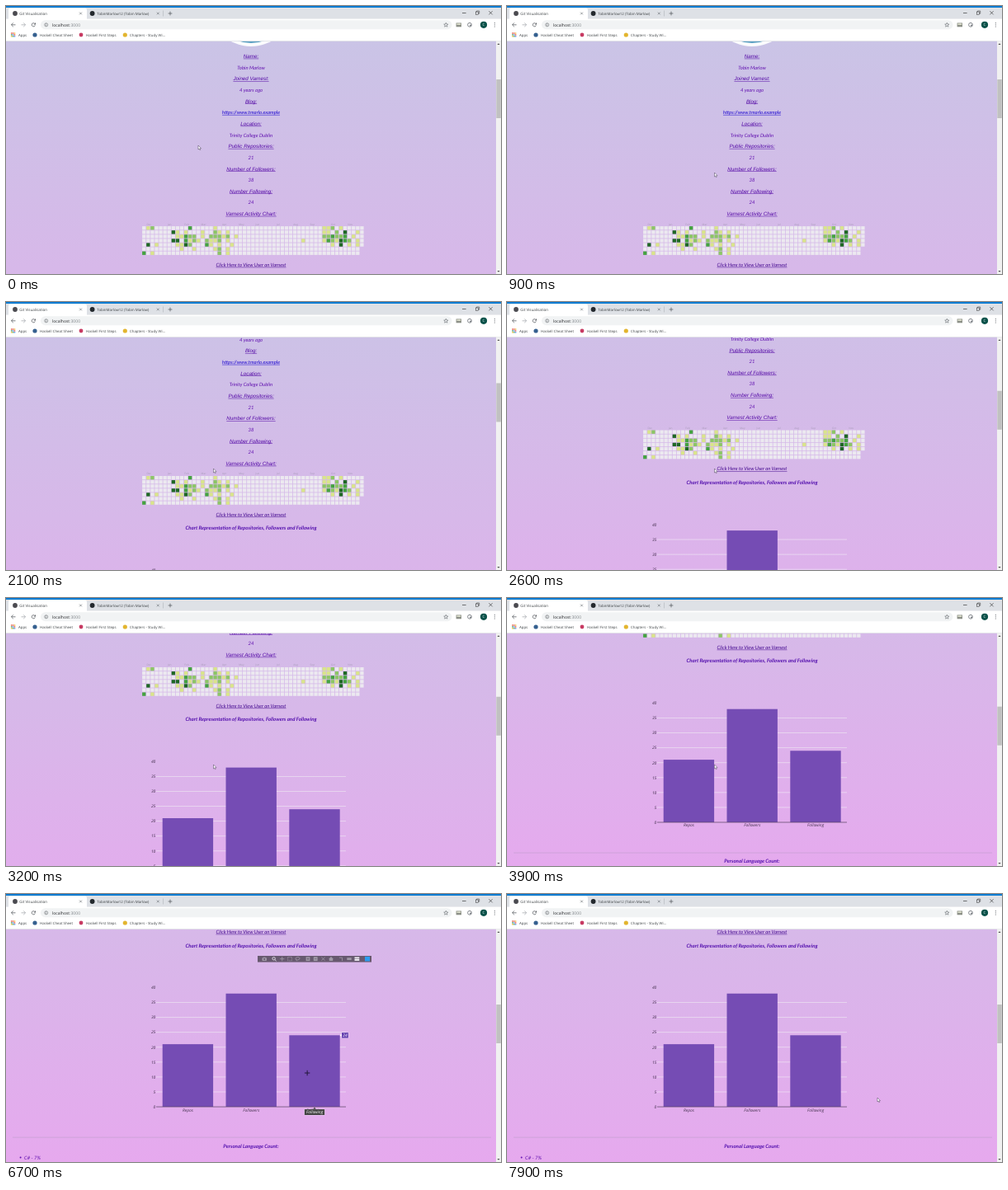
An HTML page with a canvas for the animation above (8 s loop, 600 by 325 pixels).

```html
<!DOCTYPE html>
<html lang="en">
<head>
<meta charset="utf-8">
<title>Git Visualisation</title>
<style>
html, body { margin: 0; width: 100%; height: 100%; overflow: hidden; background: #fff; }
canvas { display: block; width: 600px; height: 325px; }
</style>
</head>
<body>
<canvas id="stage"></canvas>
<script>
const W = 600, H = 325, LOOP = 8000, VIEW_TOP = 42.5, PAGE_W = 594;
const canvas = document.getElementById('stage');
const ratio = window.devicePixelRatio || 1;
canvas.width = W * ratio;
canvas.height = H * ratio;
const ctx = canvas.getContext('2d');
ctx.textRendering = 'geometricPrecision';

const BODY = 'Lato, Carlito, sans-serif';
const HEAD = '"Liberation Sans", Arial, sans-serif';
const UI = '"Open Sans", "Noto Sans", sans-serif';
const INK = '#6212b0', LINK = '#5207a5', BAR = '#754cb4';

// Motion: [time, value, slope] keys joined by cubic curves
const scrollKeys = [[1100, 0, 0], [2100, 56, .1], [3200, 183, .115], [3900, 254, .04], [4700, 268, 0]];
const mouseX = [[0, 233, 0], [850, 251.5, 0], [4800, 251.5, 0], [5300, 239, 0], [5700, 239, 0],
  [6250, 297, .08], [6700, 365, .13], [7200, 434, .04], [7700, 449, 0]];
const mouseY = [[0, 169, 0], [850, 202, 0], [4800, 202, 0], [5300, 213.5, 0], [5700, 213.5, 0],
  [6250, 207, 0], [6700, 217, .04], [7200, 241, .02], [7700, 247, 0]];

function curve(keys, t) {
  if (t <= keys[0][0]) return keys[0][1];
  for (let i = 1; i < keys.length; i++) {
    const [t0, a, m0] = keys[i - 1], [t1, b, m1] = keys[i];
    if (t > t1) continue;
    const h = t1 - t0, u = (t - t0) / h, v = 1 - u;
    return a * v * v * (1 + 2 * u) + b * u * u * (3 - 2 * u) + h * u * v * (m0 * v - m1 * u);
  }
  return keys[keys.length - 1][1];
}
const ramp = (t, a, b) => Math.min(1, Math.max(0, (t - a) / (b - a)));

function rect(x, y, w, h, fill) {
  ctx.fillStyle = fill;
  ctx.fillRect(x, y, w, h);
}
function round(x, y, w, h, r, fill) {
  ctx.fillStyle = fill;
  ctx.beginPath();
  ctx.roundRect(x, y, w, h, r);
  ctx.fill();
}
function dot(x, y, r, fill) {
  ctx.fillStyle = fill;
  ctx.beginPath();
  ctx.arc(x, y, r, 0, 7);
  ctx.fill();
}
function ring(x, y, r, color, width = .6, from = 0, to = 7) {
  ctx.strokeStyle = color;
  ctx.lineWidth = width;
  ctx.beginPath();
  ctx.arc(x, y, r, from, to);
  ctx.stroke();
}
function line(points, color, width = .6) {
  ctx.strokeStyle = color;
  ctx.lineWidth = width;
  ctx.beginPath();
  points.forEach(([x, y]) => ctx.lineTo(x, y));
  ctx.stroke();
}
function shape(points, fill) {
  ctx.fillStyle = fill;
  ctx.beginPath();
  points.forEach(([x, y]) => ctx.lineTo(x, y));
  ctx.fill();
}
function text(str, x, y, font, color, align = 'left') {
  ctx.font = font;
  ctx.fillStyle = color;
  ctx.textAlign = align;
  ctx.fillText(str, x, y);
  return ctx.measureText(str).width;
}
// Text centred on the page, y being the middle of the line
function centred(str, y, font, color, underline) {
  const w = text(str, 297, y + 2, font, color, 'center');
  if (underline) rect(297 - w / 2, y + 2.7, w, .5, underline);
}

const details = [
  ['Name:', 'Tobin Marlow'], ['Joined Varnest:', '4 years ago'],
  ['Blog:', 'https://www.tmarlo.example'], ['Location:', 'Trinity College Dublin'],
  ['Public Repositories:', '21'], ['Number of Followers:', '38'], ['Number Following:', '24'],
  ['Varnest Activity Chart:', '']
];
const bodyFont = `italic 5.95px ${BODY}`, headFont = `italic 6.25px ${HEAD}`, boldFont = `italic bold 6.15px ${BODY}`;

function drawDetails() {
  dot(297, -2, 51, '#fbfbfd');
  dot(297, -2, 47, '#5a9fc2');
  details.forEach(([label, value], i) => {
    const y = 61 + i * 27.3;
    centred(label, y, headFont, LINK, LINK);
    if (label === 'Blog:') centred(value, y + 13.6, bodyFont, '#1c06d0', '#1c06d0');
    else centred(value, y + 13.6, bodyFont, INK);
  });
}

const shades = { y: '#d9e58a', g: '#8cc665', m: '#44a340', d: '#1e6823' };
const activity = [
  '1y 2g 11m 17y 43y 44y 45g 47y',
  '7d 8y 10y 14y 17g 18y 20y 43y 44y 46g 48d 51y',
  '8y 9y 10m 11g 12g 14y 16g 17g 18g 19y 20g 22y 43g 44g 45m 46g 47g 48m 50y',
  '7d 8d 10m 11y 12g 13y 15g 16y 17y 18g 20y 38y 43y 44m 45g 46y 47d 48m 49g 51y',
  '1d 3y 8y 9y 10d 11g 15m 16y 18y 21y 45y 47d 49y 51y',
  '9y 12y 17y 18g 20y',
  '0m 2y 18g 20y'
].map(row => Object.fromEntries(row.split(' ').map(c => [parseInt(c), shades[c.slice(-1)]])));
const months = 'Dec Jan Feb Mar Apr May Jun Jul Aug Sep Oct Nov'.split(' ');
const monthCols = [1, 6, 10, 14, 19, 23, 27, 32, 36, 40, 45, 49];

function drawActivity() {
  const step = 5.08;
  months.forEach((m, i) => text(m, 165.4 + monthCols[i] * step, 265.5, `3.2px ${UI}`, '#a79ab8'));
  activity.forEach((row, r) => {
    for (let c = 0; c < (r < 5 ? 53 : 52); c++)
      rect(165.1 + c * step, 267.1 + r * step, 4.3, 4.3, row[c] || '#ece9f0');
  });
}

const valueY = v => 526 - v * 3.6125;
const bars = [['Repos', 21], ['Followers', 38], ['Following', 24]];
const barX = i => 189.7 + i * 76.8;
const tickFont = `italic 4.9px ${UI}`;

function drawChart() {
  for (let v = 0; v <= 40; v += 5) {
    if (v && v < 40) rect(182, valueY(v) - .3, 230, .7, 'rgba(240,236,244,.85)');
    text(v, 181.3, valueY(v) + 1.8, tickFont, '#45324f', 'right');
  }
  bars.forEach(([name, v], i) => {
    rect(barX(i), valueY(v), 61.4, 526 - valueY(v), BAR);
    text(name, barX(i) + 30.7, 531.5, tickFont, '#45324f', 'center');
  });
  rect(182, 525.7, 230, .7, '#55425f');
}

function drawHover(i) {
  const [name, v] = bars[i], x = barX(i) + 61.4, y = valueY(v), mid = barX(i) + 30.7;
  shape([[x, y], [x + 2.5, y - 2], [x + 2.5, y + 2]], '#fff');
  round(x + 1.9, y - 3.6, 8.7, 7.3, .3, '#f0e6fa');
  rect(x + 2.3, y - 3.2, 7.9, 6.5, '#6540b0');
  text(v, x + 6.2, y + 1.8, tickFont, '#fff', 'center');
  ctx.font = tickFont;
  const w = ctx.measureText(name).width + 4;
  shape([[mid, 526.6], [mid - 2.2, 529.5], [mid + 2.2, 529.5]], '#444');
  rect(mid - w / 2 - .3, 528.8, w + .6, 7.5, '#e8dcee');
  rect(mid - w / 2, 529.1, w, 6.9, '#444');
  text(name, mid, 534.3, tickFont, '#fff', 'center');
}

function drawModebar(alpha) {
  const y = 346.7, dim = '#a19aa8', on = '#f2eff5';
  ctx.globalAlpha = alpha;
  rect(305, 343, 138, 7.6, '#67596f');
  round(310.5, y - 1.4, 5.4, 3.6, .6, dim);
  rect(312, y - 2, 2.4, .8, dim);
  dot(313.2, y + .4, 1.1, '#67596f');
  ring(324.6, y - .4, 1.7, on, .8);
  line([[325.9, y + .9], [327.6, y + 2.5]], on, .9);
  line([[332, y], [337.4, y]], dim, .8);
  line([[334.7, y - 2.6], [334.7, y + 2.6]], dim, .8);
  ctx.setLineDash([1, .7]);
  ctx.strokeStyle = dim;
  ctx.strokeRect(341.6, y - 2.2, 4.8, 4.4);
  ctx.setLineDash([]);
  ctx.beginPath();
  ctx.ellipse(353.5, y - .4, 2.6, 1.7, -.2, 0, 7);
  ctx.stroke();
  line([[351.6, y + .8], [352.6, y + 2.6]], dim);
  for (const x of [366, 375.2]) {
    rect(x - 2.4, y - 2.4, 4.8, 4.8, dim);
    line([[x - 1.4, y], [x + 1.4, y]], '#67596f', .7);
  }
  line([[366, y - 1.4], [366, y + 1.4]], '#67596f', .7);
  line([[382.4, y - 2], [386.6, y + 2]], dim, .8);
  line([[382.4, y + 2], [386.6, y - 2]], dim, .8);
  shape([[391, y + .2], [394, y - 2.6], [397, y + .2], [396.2, y + .2], [396.2, y + 2.4], [391.8, y + 2.4], [391.8, y + .2]], dim);
  line([[404, y - 1.5], [407.5, y - 1.5], [407.5, y + 2.4]], dim, .8);
  rect(413.3, y - 1.4, 5.4, 2.8, dim);
  rect(422.5, y - 2.2, 5.8, 1.9, on);
  rect(422.5, y + .3, 5.8, 1.9, on);
  rect(435, y - 2.8, 6, 5.6, '#2b9cf0');
  ctx.globalAlpha = 1;
}

function drawPage(t, scroll, mx) {
  ctx.save();
  ctx.beginPath();
  ctx.rect(0, VIEW_TOP, PAGE_W, H);
  ctx.clip();
  ctx.translate(0, -scroll);
  const sky = ctx.createLinearGradient(0, 42, 0, 593);
  sky.addColorStop(0, '#cac4e6');
  sky.addColorStop(.5, '#d7b8e9');
  sky.addColorStop(1, '#e6a9ee');
  rect(0, 40, PAGE_W, 560, sky);
  drawDetails();
  drawActivity();
  centred('Click Here to View User on Varnest', 314, bodyFont, '#43088f', '#43088f');
  centred('Chart Representation of Repositories, Followers and Following', 330.5, boldFont, '#5410ae');
  drawChart();
  if (t > 4900 && mx < 412) drawHover(Math.min(2, Math.max(0, Math.floor((mx - 182) / 76.8))));
  const bar = ramp(t, 4900, 5200) - ramp(t, 7350, 7650);
  if (bar > 0) drawModebar(bar);
  rect(8, 562.8, 580, .5, '#b79ac4');
  centred('Personal Language Count:', 573.5, boldFont, '#5410ae');
  dot(17.6, 587.4, 1, INK);
  text('C# - 7%', 22, 589.6, bodyFont, INK);
  ctx.restore();
}

function cross(x, y, r, color) {
  line([[x - r, y - r], [x + r, y + r]], color);
  line([[x - r, y + r], [x + r, y - r]], color);
}

function drawBrowser(scroll) {
  const grey = '#5f6368', dark = '#3c4043';
  rect(0, 0, W, 16, '#dee1e6');
  rect(0, 0, W, 2, '#0a7cd2');
  round(3, 2.6, 95, 16, 2.5, '#fff');
  rect(0, 15.6, W, 27, '#fff');
  rect(0, 42, W, .5, '#d5d6da');

  const tabFont = `4.55px ${UI}`;
  dot(11, 9, 2.9, '#4a4a50');
  text('Git Visualisation', 16.2, 10.7, tabFont, dark);
  cross(90.5, 9, 1.4, grey);
  dot(104.6, 9, 2.9, '#24292e');
  text('TobinMarlow12 (Tobin Marlow)', 110.3, 10.7, `4.4px ${UI}`, dark);
  cross(184.3, 9, 1.4, grey);
  rect(190.2, 5.5, .4, 7, '#9a9ea4');
  line([[196.6, 9], [201.4, 9]], grey, .8);
  line([[199, 6.6], [199, 11.4]], grey, .8);

  line([[553, 8.5], [557.6, 8.5]], '#222', .6);
  ctx.strokeStyle = '#222';
  ctx.lineWidth = .5;
  ctx.strokeRect(569.5, 7, 3.2, 3.2);
  line([[570.5, 7], [570.5, 6], [573.7, 6], [573.7, 9.2], [572.7, 9.2]], '#222', .5);
  cross(587.5, 8.3, 2.1, '#222');

  line([[11.5, 22.8], [6.5, 22.8]], grey, .8);
  line([[8.8, 20.4], [6.4, 22.8], [8.8, 25.2]], grey, .8);
  line([[18.5, 22.8], [23.5, 22.8]], '#a9adb2', .8);
  line([[21.2, 20.4], [23.6, 22.8], [21.2, 25.2]], '#a9adb2', .8);
  ring(33.3, 22.8, 2.1, grey, .8, .3, 5.4);
  shape([[36, 20], [36, 22.5], [33.6, 22.5]], grey);

  round(42, 17.3, 498.5, 10.9, 5.4, '#f1f3f4');
  ring(48.7, 22.8, 2, grey, .6);
  rect(48.4, 22.5, .6, 1.4, grey);
  rect(48.4, 21.5, .6, .6, grey);
  const urlFont = `5.05px ${UI}`;
  const hostW = text('localhost', 56, 24.7, urlFont, '#26282b');
  text(':3000', 56 + hostW, 24.7, urlFont, '#80868b');
  const star = [];
  for (let i = 0; i <= 10; i++) {
    const r = i % 2 ? 1.2 : 2.7, a = i * Math.PI / 5 - Math.PI / 2;
    star.push([533.3 + r * Math.cos(a), 23 + r * Math.sin(a)]);
  }
  line(star, grey, .6);
  rect(545.6, 20.5, 6.4, 4.8, '#8b8f86');
  rect(546.4, 21.2, 4.8, 1.8, '#d9dbc9');
  ring(562, 22.8, 2.4, '#777b80', .9);
  dot(563, 23.5, 1, '#777b80');
  dot(579, 22.8, 4.1, '#0a5149');
  text('C', 579, 24.4, `4.5px ${UI}`, '#e3f1ee', 'center');
  for (const y of [20.6, 22.8, 25]) dot(592.3, y, .6, grey);

  const marks = ['#e34b3c', '#e34b3c', '#f0b429', '#3f9b57', '#4a86e0', '#e34b3c', '#f0b429', '#3f9b57', '#4a86e0'];
  marks.forEach((c, i) => rect(6 + i % 3 * 1.9, 32.3 + Math.floor(i / 3) * 1.9, 1.4, 1.4, c));
  const markFont = `4.35px ${UI}`;
  text('Apps', 15, 36.7, markFont, dark);
  dot(35, 35, 2.6, '#35608f');
  text('Haskell Cheat Sheet', 41, 36.7, markFont, dark);
  dot(91, 35, 2.4, '#c73a62');
  text('Haskell First Steps', 97, 36.7, markFont, dark);
  dot(144.3, 35, 2.6, '#e2b52e');
  text('Chapters - Study Wi...', 150, 36.7, markFont, dark);

  rect(PAGE_W, VIEW_TOP, 6, H, '#f1f1f1');
  rect(PAGE_W + .3, 89 + scroll * .168, 5.5, 47, '#c1c1c1');
  shape([[595.4, 47], [598.6, 47], [597, 45.2]], '#505050');
  shape([[595.4, 321], [598.6, 321], [597, 322.8]], '#505050');
}

function drawPointer(x, y, aim) {
  if (aim) {
    line([[x - 3.2, y], [x + 3.2, y]], '#1c1430', .9);
    line([[x, y - 3.2], [x, y + 3.2]], '#1c1430', .9);
    return;
  }
  const arrow = [[0, 0], [0, 5], [1.1, 4], [1.9, 5.7], [2.7, 5.3], [2, 3.7], [3.5, 3.6], [0, 0]]
    .map(([dx, dy]) => [x + dx, y + dy]);
  shape(arrow, '#fff');
  line(arrow, '#3b3348', .45);
}

function draw(t) {
  ctx.setTransform(ratio, 0, 0, ratio, 0, 0);
  const scroll = curve(scrollKeys, t), mx = curve(mouseX, t), my = curve(mouseY, t);
  drawPage(t, scroll, mx);
  drawBrowser(scroll);
  drawPointer(mx, my, t > 4900 && mx < 412);
}

const start = performance.now();
function tick() {
  draw((performance.now() - start) % LOOP);
  requestAnimationFrame(tick);
}
tick();
</script>
</body>
</html>
```
